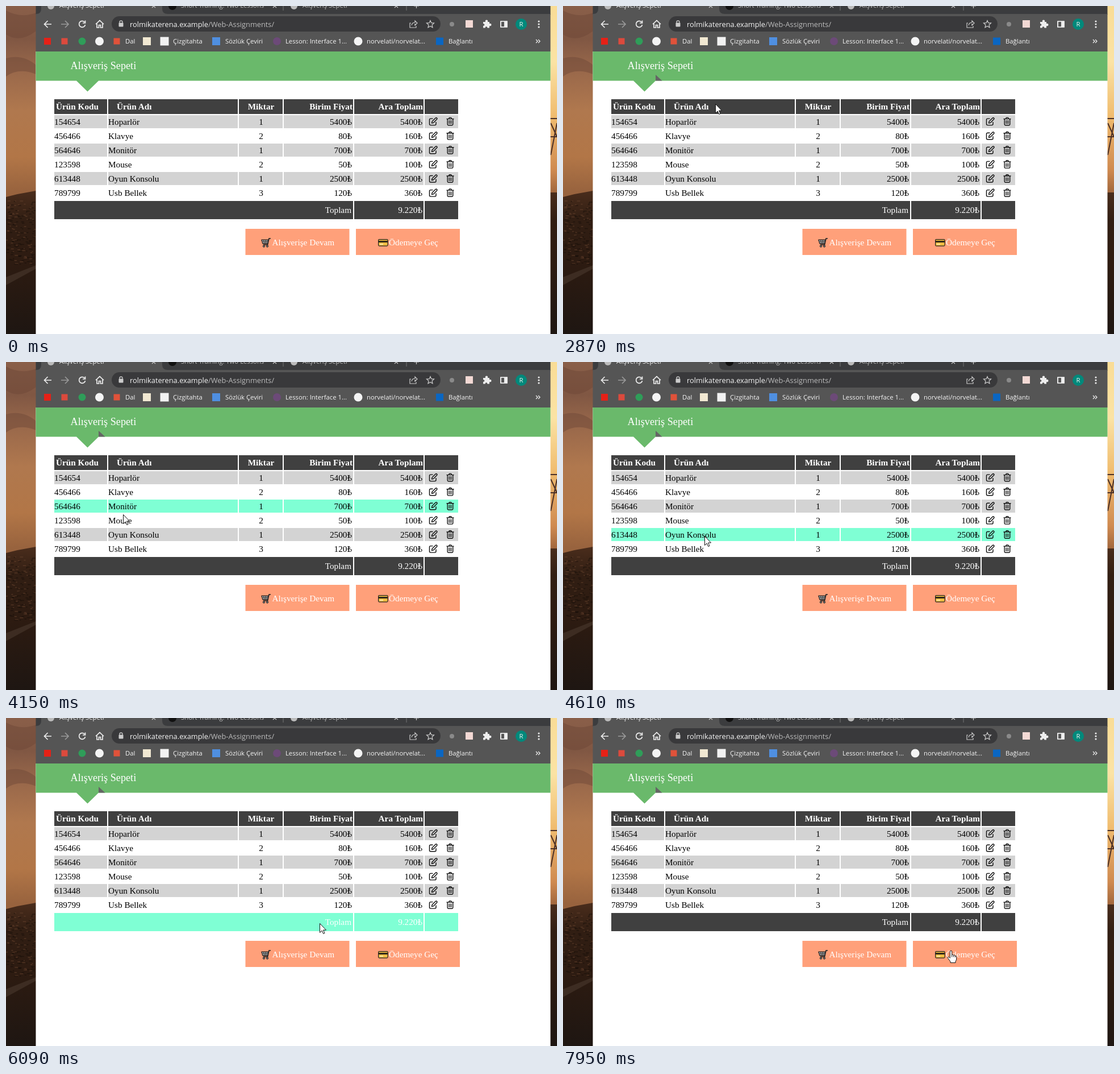
An HTML page that plays this animation: 970 by 577 pixels, repeating every 8000 ms.

```html
<!DOCTYPE html>
<html lang="tr">
<head>
<meta charset="utf-8">
<title>Alışveriş Sepeti</title>
<style>
html, body { margin: 0; width: 100%; height: 100%; overflow: hidden; background: #fff; }
svg { display: block; width: 100%; height: 100%; }
.ui { font: 11.3px "Open Sans", "Noto Sans", sans-serif; fill: #f4f4f4; }
.page { font: 15.25px "Liberation Serif", "Noto Serif", serif; fill: #000; }
.line { fill: none; stroke: #eee; stroke-width: 1.7; }
.row0 { fill: #d3d3d3; }
.row1 { fill: #fff; }
.total { fill: #404040; }
.hot { fill: #7fffd4; }
</style>
</head>
<body>
<svg id="stage" viewBox="0 0 970 577" xmlns="http://www.w3.org/2000/svg">
  <defs>
    <linearGradient id="dusk" x2="0" y2="1">
      <stop offset="0" stop-color="#8a5f49"/><stop offset=".1" stop-color="#805743"/>
      <stop offset=".18" stop-color="#96664a"/><stop offset=".32" stop-color="#b0784e"/>
      <stop offset=".46" stop-color="#b27647"/><stop offset=".565" stop-color="#98633e"/>
    </linearGradient>
    <linearGradient id="glow" x2="0" y2="1">
      <stop offset="0" stop-color="#f9dc96"/><stop offset=".17" stop-color="#fbe3a4"/>
      <stop offset=".33" stop-color="#f0bd70"/><stop offset=".5" stop-color="#cf8a50"/>
      <stop offset=".57" stop-color="#a0663d"/>
    </linearGradient>
    <linearGradient id="land" x2="0" y2="1">
      <stop offset="0" stop-color="#4a2d1c"/><stop offset=".2" stop-color="#311e13"/>
      <stop offset=".5" stop-color="#2d1b11"/><stop offset="1" stop-color="#1e1612"/>
    </linearGradient>
    <g id="edit" fill="none" stroke="#111" stroke-width="1.450" stroke-linejoin="round">
      <path d="M7 2.500H3Q1 2.500 1 4.500V12Q1 14 3 14H10.500Q12.500 14 12.500 12V8.500"/>
      <path d="M5 10.500 5.700 7.500 12 1.200Q13 .6 14 1.500T14.200 3.500L8 9.800Z"/>
    </g>
    <g id="bin" fill="none" stroke="#111" stroke-width="1.400">
      <path d="M0 3H13M4 2.700 5 .8H8L9 2.700M1.700 3V12.500Q1.700 14.200 3.300 14.200H9.700Q11.300 14.200 11.300 12.500V3"/>
      <path d="M4.300 5.500V12M6.500 5.500V12M8.700 5.500V12" stroke-width="1.100"/>
    </g>
  </defs>

  <!-- wallpaper -->
  <path fill="url(#dusk)" d="M0 0H53V577H0Z"/>
  <path fill="#6c4637" opacity=".45" d="M0 8Q26 22 53 12V44Q24 66 0 50ZM0 92Q30 84 53 104V120Q22 108 0 124Z"/>
  <path fill="url(#glow)" d="M958 0H970V577H958Z"/>
  <path stroke="#4b3026" stroke-width="2" d="M958 198H970M958 230H970M959 262 970 206M959 206 970 230" fill="none"/>
  <path fill="url(#land)" d="M0 336 20 331 53 325V577H0ZM958 328H970V577H958Z"/>
  <path fill="#4a3a2e" opacity=".6" d="M0 477 53 456V462L0 491Z"/>
  <g id="grass"></g>

  <!-- browser -->
  <path fill="#3b3c3e" d="M52.500 0H958.500V15H52.500Z"/>
  <path fill="#555" d="M52.500 14Q62 14 62 5V0H275V5Q275 14 285 14H958.500V80H52.500Z"/>
  <rect x="186" y="18" width="579" height="27" rx="13.500" fill="#39393b"/>
  <g class="line">
    <path d="M80 32H68M73.500 26 67.500 32 73.500 38"/>
    <path d="M97 32H109M104 26 110 32 104 38" stroke="#999"/>
    <path d="M138.500 28.500A5.500 5.500 0 1 0 139.500 33M139.500 25.500V30H135"/>
    <path d="M158 32 165 25.500 172 32M160 31V38H163.500V33.500H166.500V38H170V31"/>
    <path d="M200 30V28Q200 26 202.500 26T205 28V30" stroke="#ccc" stroke-width="1.300"/>
    <path d="M713 30H711V38H722V35M714 34Q715 29 720 29V26L724 30 720 34V31" stroke="#ccc" stroke-width="1.200"/>
    <path d="M747 25.500 748.800 29.700 753.500 30.100 750 33.200 751 37.800 747 35.400 743 37.800 744 33.200 740.500 30.100 745.200 29.700Z" stroke="#ccc" stroke-width="1.200"/>
    <path d="M871 27H882V37H871Z" stroke="#fff"/>
    <path d="M257-3 263 3M263-3 257 3M470-3 476 3M476-3 470 3M684-3 690 3M690-3 684 3M718 0H727M722.500-4V4" stroke="#ccc" stroke-width="1.200"/>
    <path d="M488 0V8M705 0V8" stroke="#777" stroke-width="1"/>
    <path d="M933 59 936 62 933 65M937 59 940 62 937 65" stroke-width="1.300"/>
  </g>
  <g fill="#eee">
    <rect x="198.500" y="29.500" width="8" height="7" rx="1" fill="#ccc"/>
    <path d="M877 27H882V37H877Z"/>
    <path d="M840 28H844Q843 24.500 846 24.500T848 28H851V31Q854.500 30 854.500 33T851 35V38.500H847.500Q847 36 845.500 36T843.500 38.500H840V35Q842.500 34.500 842.500 33T840 31Z"/>
    <circle cx="938" cy="27" r="1.600"/><circle cx="938" cy="32" r="1.600"/><circle cx="938" cy="37" r="1.600"/>
  </g>
  <circle cx="907" cy="32" r="10" fill="#00897b"/>
  <g id="chrome" class="ui"></g>

  <!-- page -->
  <path fill="#fff" d="M52.500 80H958.500V577H52.500Z"/>
  <path fill="#6ab96b" d="M52.500 80H958.500V131.500H163L143.500 150.500 124 131.500H52.500Z"/>
  <path id="fold" fill="#656565" d="M163 121 174.500 131.500H163Z"/>
  <g id="page" class="page"></g>
  <g transform="translate(449 408)" fill="none" stroke="#222">
    <path d="M17 1H14L11.500 12H4" stroke-width="1.700"/>
    <path d="M1 3.500H13L11.700 10H3Z" fill="#ddd" stroke-width="1.300"/>
    <path d="M4.500 4 5.500 10M7.500 4V10M10.500 4 9.500 10M2 6.700H12"/>
    <circle cx="5" cy="14.500" r="1.700" fill="#777"/><circle cx="11" cy="14.500" r="1.700" fill="#777"/>
  </g>
  <g transform="translate(655 410)">
    <rect x=".6" y=".6" width="16.500" height="11.500" rx="1.500" fill="#f2bd43" stroke="#222" stroke-width="1.200"/>
    <path d="M1 3H17V6H1Z" fill="#332a1a"/><path d="M3 9H9" stroke="#fff3c4" stroke-width="1.500"/>
  </g>

  <g id="cursor" fill="#fff" stroke="#111" stroke-linejoin="round">
    <path id="arrow" d="M.5 .5V16.500L4.200 13 6.700 18.500 9 17.500 6.600 12H11.500Z"/>
    <path id="hand" d="M-1.700 13V2Q-1.700 .4 0 .4T1.700 2V7.500Q3.800 6.400 4.600 8.300 6.500 7.500 7.300 9.300 9.700 8.900 9.700 11.500V15Q9.700 17 8 19V21.500H-1V19.500L-5.300 13.500Q-6.300 11.800-5 11.300T-1.700 13.500M1.700 7.500V11.500M4.600 8.500V11.500M7.300 9.500V12"/>
  </g>
</svg>
<script>
const $ = id => document.getElementById(id);
const text = (x, y, str, attrs = '') => `<text x="${x}" y="${y}" ${attrs}>${str}</text>`;
const rect = (x, y, w, h, attrs = '') => `<rect x="${x}" y="${y}" width="${w}" height="${h}" ${attrs}/>`;
const dot = (x, y, r, fill) => `<circle cx="${x}" cy="${y}" r="${r}" fill="${fill}"/>`;
const box = (x, y, s, fill) => rect(x - s / 2, y - s / 2, s, s, `fill="${fill}"`);
const END = 'text-anchor="end"', MID = 'text-anchor="middle"', WHITE = 'fill="#fff"', DIM = 'fill="#bbb"';

// Dry grass, scattered by a seeded generator
let seed = 7;
const random = () => (seed = seed * 16807 % 2147483647) / 2147483647;
$('grass').innerHTML = Array.from({ length: 170 }, () => {
  const fill = random() < .5 ? '#6a4630' : '#150d09';
  return rect(random() * 50, 342 + random() * 112, 2 + random() * 4, 1.5, `fill="${fill}" opacity=".55"`);
}).join('');

// Tabs, address and bookmarks
$('chrome').innerHTML =
  dot(79, 0, 6, '#bbb') + dot(293, 0, 7, '#111') + dot(507, 0, 6, '#bbb') +
  text(94, 3, 'Alışveriş Sepeti') + text(308, 3, 'Short Training: Two Lessons', DIM) +
  text(522, 3, 'Alışveriş Sepeti', DIM) +
  text(218, 36.5, `rolmikaterena.example<tspan ${DIM}>/Web-Assignments/</tspan>`, 'font-size="12.8"') +
  text(907, 36, 'R', MID) + dot(785, 32, 4, '#8a8a8a') + box(815.5, 31.5, 13, '#f3d9d4') +
  box(73, 62, 12, '#e62117') + box(103, 62, 11, '#dc4a3d') + dot(134, 62, 6.5, '#2f9d59') +
  dot(164.5, 62, 7.5, '#f4f4f4') + box(195, 62, 11, '#e0523a') + box(248, 62, 14, '#f1e8d2') +
  box(279, 62, 15, '#f2f2f2') + box(370, 62, 14, '#4f8fe0') + dot(477, 62, 7, '#6c4a78') +
  dot(620, 62, 7.5, '#f4f4f4') + box(763.5, 62, 13, '#0a66c2') +
  [[210, 'Dal'], [294, 'Çizgitahta'], [386, 'Sözlük Çeviri'], [492, 'Lesson: Interface 1...'],
   [635, 'norvelati/norvelat...'], [779, 'Bağlantı']].map(([x, s]) => text(x, 66, s)).join('');

// Basket table
const columns = [[85, 93], [180, 228], [410, 77], [489, 122], [613, 122], [737, 59]];
const items = [
  ['154654', 'Hoparlör', 1, 5400], ['456466', 'Klavye', 2, 80], ['564646', 'Monitör', 1, 700],
  ['123598', 'Mouse', 2, 50], ['613448', 'Oyun Konsolu', 1, 2500], ['789799', 'Usb Bellek', 3, 120]];
const cells = (list, y, h) => list.map(([x, w]) => rect(x, y, w, h)).join('');

const head = `<g class="total">${cells(columns, 164, 26)}</g><g fill="#fff" font-weight="bold">` +
  text(88, 182, 'Ürün Kodu') + text(195, 182, 'Ürün Adı') + text(449, 182, 'Miktar', MID) +
  text(610, 182, 'Birim Fiyat', END) + text(734, 182, 'Ara Toplam', END) + '</g>';

const body = items.map(([code, name, count, price], i) => {
  const y = 192 + 25 * i, base = 208.6 + 25.1 * i;
  return `<g class="row${i % 2}" data-row>${cells(columns, y, 23)}</g>` +
    text(85, base, code) + text(180, base, name) + text(449, base, count, MID) +
    text(609, base, price + '₺', END) + text(733, base, price * count + '₺', END) +
    `<use href="#edit" x="744.5" y="${base - 13}"/><use href="#bin" x="775.5" y="${base - 13}"/>`;
}).join('');

const foot = `<g class="total" data-row>${cells([[85, 526], columns[4], columns[5]], 343, 32)}</g>` +
  `<g ${WHITE}>${text(608, 364, 'Toplam', END)}${text(733, 364, '9.220₺', END)}</g>`;

$('page').innerHTML = text(113.5, 111, 'Alışveriş Sepeti', 'fill="#fff" font-size="18.2"') +
  head + body + foot +
  `<g fill="#ffa07a">${rect(421.5, 392, 183, 46)}${rect(616, 392, 183, 46)}</g>` +
  text(468.5, 421, 'Alışverişe Devam', WHITE) + text(674, 421, 'Ödemeye Geç', WHITE);

// Pointer path: time, x, y
const path = [
  [330, 925, 562], [600, 900, 420], [850, 810, 270], [1060, 730, 179], [1330, 520, 118],
  [1600, 284, 83], [1930, 178, 105], [2200, 144, 128], [2500, 160, 160], [2800, 234, 188],
  [2867, 268, 172], [3200, 268, 196], [3600, 240, 219], [4133, 206, 268], [4467, 232, 296],
  [4800, 280, 320], [5267, 361, 342], [5700, 470, 356], [6090, 555, 362], [6400, 548, 395],
  [6667, 537, 421], [6950, 512, 428], [7270, 469, 424], [7530, 530, 412], [7820, 610, 407],
  [7933, 683, 409], [8000, 690, 409]];
// Start times of hovering each row, then of leaving the table
const hover = [3080, 3460, 3850, 4190, 4380, 4740, 5130, 6150];
const rows = [...document.querySelectorAll('[data-row]')];

const slope = (i, k) => {
  const a = path[Math.max(i - 1, 0)], b = path[Math.min(i + 1, path.length - 1)];
  return (b[k] - a[k]) / (b[0] - a[0]);
};
function pointerAt(t) {
  const n = Math.max(1, path.findIndex(p => p[0] >= t)), a = path[n - 1], b = path[n];
  const d = b[0] - a[0], u = Math.max(0, (t - a[0]) / d), s = u * u * (3 - 2 * u);
  return [1, 2].map(k => a[k] + (b[k] - a[k]) * s +
    d * u * (1 - u) * ((1 - u) * slope(n - 1, k) - u * slope(n, k)));
}

const show = (id, on) => $(id).setAttribute('visibility', on ? 'visible' : 'hidden');
const STEP = 1000 / 15;

function draw(now) {
  const t = Math.floor((now % 8000) / STEP + 1e-6) * STEP;
  const [x, y] = pointerAt(t).map(Math.round);
  const onButton = y > 392 && y < 438 && (x > 421 && x < 605 || x > 616 && x < 799);
  const visible = t >= 330;
  $('cursor').setAttribute('transform', `translate(${x} ${y})`);
  show('arrow', visible && !onButton);
  show('hand', visible && onButton);
  show('fold', t >= 2250);
  rows.forEach((row, i) => row.classList.toggle('hot', t >= hover[i] && t < hover[i + 1]));
  requestAnimationFrame(draw);
}
requestAnimationFrame(draw);
</script>
</body>
</html>
```
